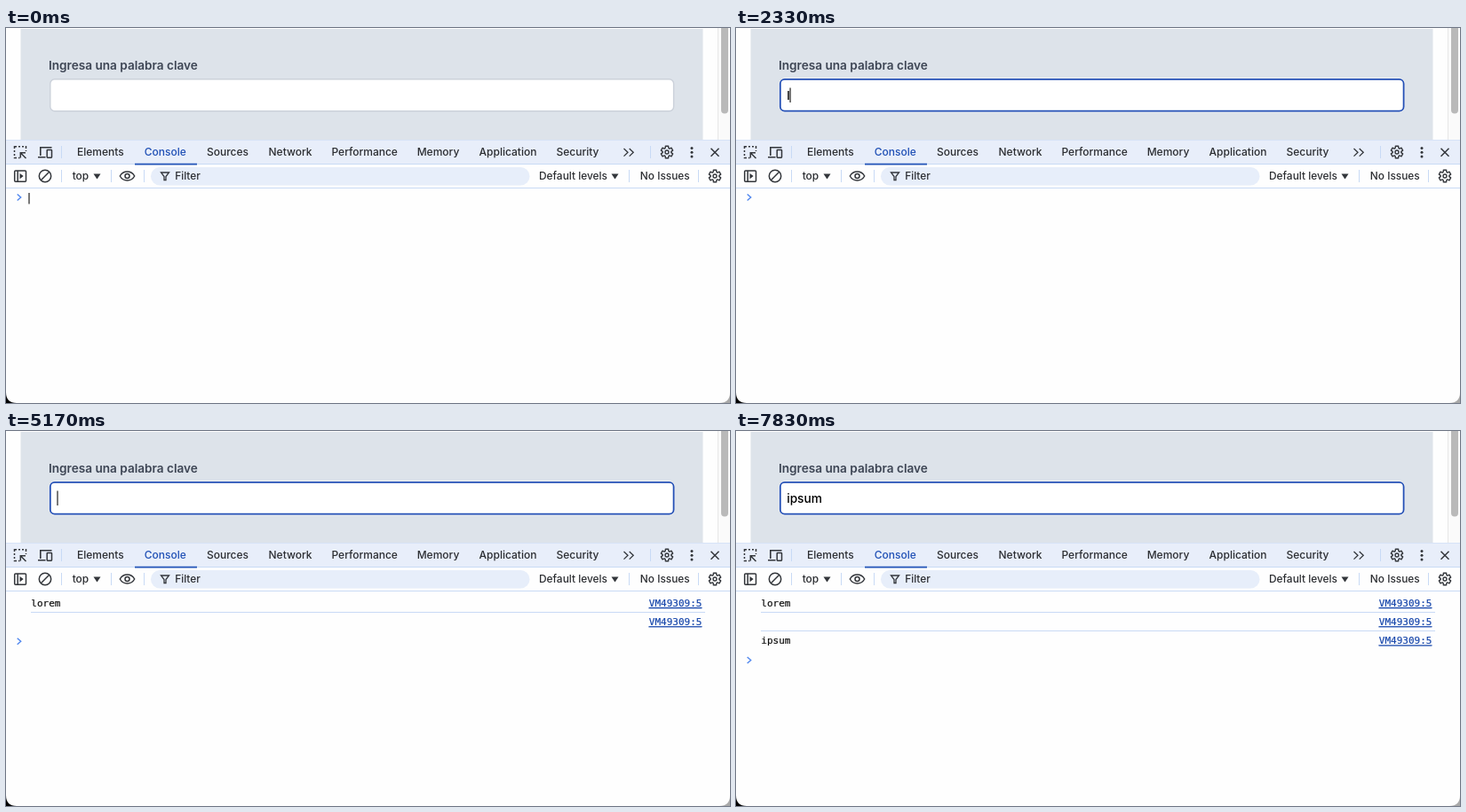
Write an HTML page that moves like this. It is 815 px wide and 423 px high and loops after 8 s.

```html
<!DOCTYPE html>
<html lang="es">
<head>
<meta charset="utf-8">
<title>Consola</title>
<style>
  html, body { margin: 0; width: 100%; height: 100%; overflow: hidden; background: #fff; }
  svg { display: block; width: 815px; height: 423px; }
  text { font: 450 12px Inter, sans-serif; fill: #2b2d31; }
  .tabs text { text-anchor: middle; }
  .tabs .on { fill: #1f4fb5; }
  .label { font-size: 13.6px; font-weight: 600; fill: #3d4554; }
  .value { font-size: 13.7px; fill: #000; }
  .bar text { font-size: 11.9px; }
  .log text { font: 11px "DejaVu Sans Mono", monospace; fill: #111; stroke: #111; stroke-width: .2; }
  .log .link { fill: #1847ab; stroke: #1847ab; text-decoration: underline; }
  .icon { fill: none; stroke: #33363b; stroke-width: 1.5; }
  .solid { fill: #33363b; stroke: none; }
  .rule { stroke: #c8daf5; }
  .caret { stroke: #1f1f1f; stroke-width: 1.2; }
</style>
</head>
<body>
<svg viewBox="0 0 815 423">
  <defs>
    <g id="gear" class="icon">
      <path id="cog" stroke-width="1.400" stroke-linejoin="round"/>
      <circle r="2" stroke-width="1.400"/>
    </g>
    <path id="ibeam" d="M-3.500 -7.500Q0 -7.500 0 -5 0 -7.500 3.500 -7.500M0 -5V5M-3.500 7.500Q0 7.500 0 5 0 7.500 3.500 7.500M-2 2.500H2"/>
  </defs>

  <!-- page -->
  <rect width="815" height="423" fill="#fefefe"/>
  <rect x="16.500" y="1" width="768" height="125" fill="#dde3ea"/>
  <rect x="801" width="14" height="126" fill="#fafafa"/>
  <path d="M801.500 0V126" stroke="#e6e6e6"/>
  <rect x="805" y="-10" width="8" height="106.500" rx="4" fill="#b9b9b9"/>
  <text class="label" x="48" y="47.300">Ingresa una palabra clave</text>
  <rect id="halo" x="48.700" y="56.700" width="704" height="38" rx="6.500" fill="none" stroke="#fff" stroke-opacity=".5"/>
  <rect id="field" x="49.800" y="57.800" width="701.800" height="35.900" rx="5" fill="#fff"/>
  <text id="value" class="value" x="57.200" y="80.700"></text>
  <path id="caret" class="caret"/>

  <!-- tab bar -->
  <rect y="126" width="815" height="28" fill="#e8eefa"/>
  <path class="rule" d="M0 126.500H815" opacity=".5"/>
  <path class="rule" d="M0 153.500H815M0 180.500H815M62.500 133V147M725.500 133V147M62.500 160V174M118.500 160V174M155.500 160V174M701.500 160V174M779.500 160V174"/>
  <rect x="145" y="152.700" width="70" height="1.800" fill="#2355b8"/>
  <g id="tabs" class="tabs"></g>
  <g class="icon">
    <path d="M9.500 136V133.700H12M14 133.700H16M18 133.700H20M21.800 133.700H22.500V136M9.500 138V140M9.500 142V144M9.500 146V146.500H12M14 146.500H15.500M22.500 138V139"/>
    <path d="M22.500 147 17 141.500M16.300 146.500V140.700H22"/>
    <path d="M38.800 144V134.700H51.500M36 145.700H44.500" stroke-width="1.600"/>
    <rect x="46.200" y="137.500" width="5.300" height="8.700" rx=".6"/>
    <path d="M695.500 136 700 140.300 695.500 144.600M701.700 136 706.200 140.300 701.700 144.600" stroke-width="1.300"/>
    <path d="M793.500 135.700 802.500 144.700M802.500 135.700 793.500 144.700"/>
  </g>
  <use href="#gear" x="744" y="140"/>
  <g class="solid">
    <circle cx="772" cy="135.500" r="1.500"/><circle cx="772" cy="140.200" r="1.500"/><circle cx="772" cy="144.900" r="1.500"/>
  </g>

  <!-- console toolbar -->
  <rect x="163" y="157" width="426.500" height="20.500" rx="10.250" fill="#e7eefa"/>
  <g class="icon">
    <rect x="9.700" y="161" width="12.800" height="12.300" rx="1"/>
    <path d="M13.200 161V173.300"/>
    <circle cx="44" cy="167" r="6.700"/>
    <path d="M39.300 171.700 48.700 162.300"/>
    <path d="M128.300 167C132 160.400 141 160.400 144.700 167 141 173.600 132 173.600 128.300 167Z"/>
    <circle cx="136.500" cy="167" r="2.500"/>
    <path d="M174.500 163H183.500L180 167.500V171.500H178V167.500Z" stroke-width="1.300"/>
  </g>
  <path class="solid" d="M15.500 164 19.700 167.100 15.500 170.200ZM98.500 164.500H106.500L102.500 170.500ZM681.500 164.500H689.500L685.500 170.500Z"/>
  <use href="#gear" x="798" y="167"/>
  <g class="bar">
    <text x="74.700" y="171.400">top</text>
    <text x="190.200" y="171.400">Filter</text>
    <text x="600" y="171.400">Default levels</text>
    <text x="713.800" y="171.400">No Issues</text>
  </g>

  <!-- console -->
  <g id="log" class="log"></g>
  <path id="prompt" d="M12.700 -3.500 16.700 0 12.700 3.500" fill="none" stroke="#4f86ee" stroke-width="1.400"/>
  <path id="conCaret" class="caret" d="M26 186V198.500"/>

  <!-- window corners -->
  <path d="M0 411Q0 423 12 423H0Z"/>
  <path d="M815 411Q815 423 803 423H815Z" fill="#a9a9a9"/>

  <!-- mouse -->
  <g id="beam" fill="none" stroke-linecap="round">
    <use href="#ibeam" stroke="#fff" stroke-width="2.800"/>
    <use href="#ibeam" stroke="#111" stroke-width="1.300"/>
  </g>
  <path id="arrow" d="M0 0V14L3.300 11 5.500 16 7.800 15 5.600 10.200H10Z" fill="#111" stroke="#fff"/>
</svg>

<script>
const LOOP = 8000, FOCUS = 1330;
const $ = id => document.getElementById(id);
const NS = 'http://www.w3.org/2000/svg';

function add(parent, tag, attrs, text = '') {
  const el = document.createElementNS(NS, tag);
  for (const k in attrs) el.setAttribute(k, attrs[k]);
  el.textContent = text;
  return parent.appendChild(el);
}
const show = (el, on) => el.setAttribute('visibility', on ? 'visible' : 'hidden');

// Six-toothed outline: each tooth has two root and two tip corners.
function cogPath(teeth, root, tip) {
  const points = [];
  for (let i = 0; i < teeth; i++)
    for (const [r, deg] of [[root, -22], [tip, -14], [tip, 14], [root, 22]]) {
      const a = (i * 360 / teeth + deg - 90) * Math.PI / 180;
      points.push(`${(r * Math.cos(a)).toFixed(2)} ${(r * Math.sin(a)).toFixed(2)}`);
    }
  return `M${points.join('L')}Z`;
}
$('cog').setAttribute('d', cogPath(6, 4.9, 6.9));

const tabs = { Elements: 106.3, Console: 179.3, Sources: 249.5, Network: 320,
  Performance: 403.7, Memory: 486.5, Application: 565, Security: 643.5 };
for (const name in tabs)
  add($('tabs'), 'text', { x: tabs[name], y: 144.4, class: name === 'Console' ? 'on' : '' }, name);

// Log rows: a rule separates each row from the one above.
const rows = [[3500, 'lorem'], [5170, ''], [6830, 'ipsum']].map(([at, text], i) => {
  const g = add($('log'), 'g', {}), y = 198 + 21.2 * i;
  if (i) add(g, 'path', { class: 'rule', d: `M28 ${183.5 + 21 * i}H787` });
  add(g, 'text', { x: 28.3, y }, text);
  add(g, 'text', { x: 723.8, y, class: 'link' }, 'VM49309:5');
  return { at, g };
});

// [time, field text, caret shown]
const typing = [
  [0, '', 1], [500, '', 0], [1000, '', 1], [2000, '', 0],
  [2330, 'l', 1], [2500, 'lor', 1], [2670, 'lore', 1], [3000, 'lorem', 1],
  [3500, 'lorem', 0], [4000, 'lorem', 1], [4500, 'lorem', 0],
  [4670, '', 0], [5000, '', 1], [5500, '', 0],
  [5670, 'i', 1], [5830, 'ip', 1], [6000, 'ips', 1], [6170, 'ipsu', 1], [6330, 'ipsum', 1],
  [6830, 'ipsum', 0], [7330, 'ipsum', 1], [7830, 'ipsum', 0]
];

// [time, x, y]; hidden without a position
const mouse = [[0], [670, 398, 186], [830, 374, 147], [1000, 350, 104],
  [1170, 338, 84], [1330, 336, 79.5], [2330]];

const at = (steps, t) => steps.findLast(s => s[0] <= t);

function draw(t) {
  const focused = t >= FOCUS;
  const [, text, caret] = at(typing, t);
  $('field').setAttribute('stroke', focused ? '#234fb5' : '#cbd1da');
  $('field').setAttribute('stroke-width', focused ? 1.8 : 1.4);
  show($('halo'), focused);
  const value = $('value');
  if (value.textContent !== text) value.textContent = text;
  const x = text ? 57.6 + value.getComputedTextLength() : 58;
  $('caret').setAttribute('d', `M${x} 67.500V84`);
  show($('caret'), caret && focused);
  show($('conCaret'), caret && !focused);

  let count = 0;
  for (const { at: start, g } of rows) {
    show(g, t >= start);
    if (t >= start) count++;
  }
  const y = count ? 194.8 + 21.25 * count : 191;
  $('prompt').setAttribute('transform', `translate(0 ${y})`);

  const [, mx, my] = at(mouse, t);
  const overText = my < 95 || my > 181;
  show($('beam'), mx && overText);
  show($('arrow'), mx && !overText);
  if (mx) for (const id of ['beam', 'arrow']) $(id).setAttribute('transform', `translate(${mx} ${my})`);
}

const start = performance.now();
function tick() {
  draw((performance.now() - start) % LOOP);
  requestAnimationFrame(tick);
}
tick();
</script>
</body>
</html>
```
